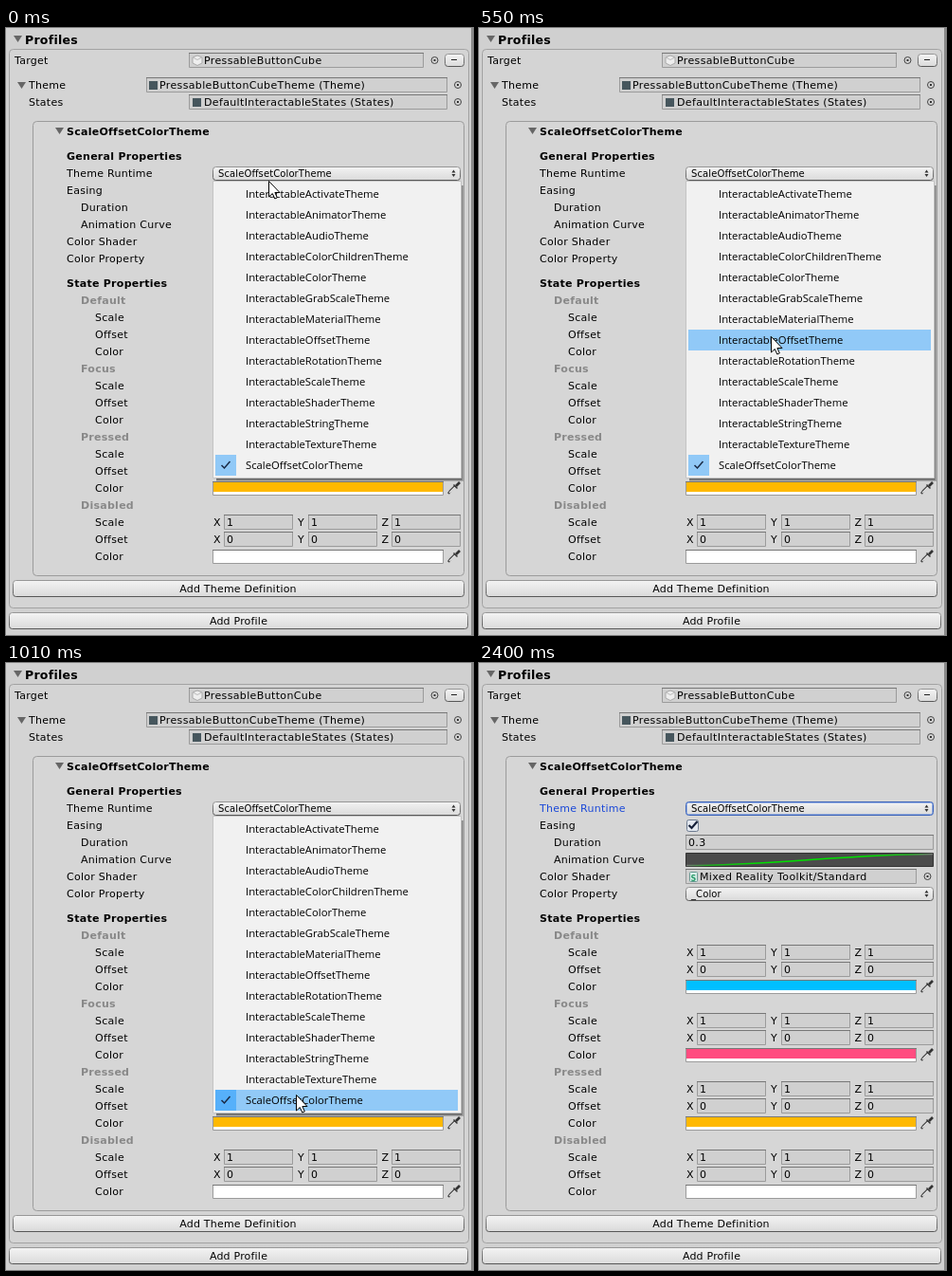
Animation of 493 by 640 pixels, one loop 3.15 s. Source, as an HTML page with a canvas:

```html
<!DOCTYPE html>
<html>
<head>
<meta charset="utf-8">
<style>
html, body { margin: 0; width: 100%; height: 100%; overflow: hidden; background: #d0d0d0; }
canvas { display: block; }
</style>
</head>
<body>
<canvas id="stage" width="493" height="640"></canvas>
<script>
const g = document.getElementById('stage').getContext('2d');
const LOOP = 3150, MENU_CLOSE = 1700, FOCUS = 1750, CURSOR_GONE = 2400;
const MENU_TOP = 164, ROW = 22;
const ITEMS = ['Activate', 'Animator', 'Audio', 'ColorChildren', 'Color', 'GrabScale', 'Material',
  'Offset', 'Rotation', 'Scale', 'Shader', 'String', 'Texture']
  .map(n => `Interactable${n}Theme`).concat('ScaleOffsetColorTheme');

// Bursts of pointer movement: start, end, number of steps
const BURSTS = [[50, 550, 10], [610, 1010, 8], [1700, 2160, 9], [2280, 2400, 3]];
// Pointer path: time, x, y
const PATH = [[0, 277, 161], [50, 279, 166], [272, 302, 235], [550, 308, 325], [610, 309, 350],
  [667, 309, 386], [900, 307, 445], [1010, 306, 455], [1760, 306, 455], [1900, 313, 473],
  [2160, 354, 559], [2280, 364, 578], [2340, 376, 602], [3150, 376, 602]];

function text(s, x, y, { size = 11, bold = false, color = '#000', align = 'left', gap = 0.27 } = {}) {
  g.font = `${bold ? 'bold ' : ''}${size}px "DejaVu Sans", sans-serif`;
  g.letterSpacing = gap + 'px';
  g.textAlign = align;
  g.fillStyle = color;
  g.fillText(s, x, y + 4);
}

function fill(x, y, w, h, color) {
  g.fillStyle = color;
  g.fillRect(x, y, w, h);
}

function box(x, y, w, h, back, edge, r = 0) {
  g.beginPath();
  g.roundRect(x + 0.5, y + 0.5, w - 1, h - 1, r);
  g.fillStyle = back;
  g.fill();
  g.strokeStyle = edge;
  g.lineWidth = 1;
  g.stroke();
}

function poly(points, color, edge) {
  g.beginPath();
  points.forEach(([x, y]) => g.lineTo(x, y));
  g.closePath();
  g.fillStyle = color;
  g.fill();
  if (edge) {
    g.strokeStyle = edge;
    g.lineWidth = 1;
    g.stroke();
  }
}

function line(points, color, width) {
  g.beginPath();
  points.forEach(([x, y]) => g.lineTo(x, y));
  g.strokeStyle = color;
  g.lineWidth = width;
  g.stroke();
}

function shade(y, h, top, bottom) {
  const s = g.createLinearGradient(0, y, 0, y + h);
  s.addColorStop(0, top);
  s.addColorStop(1, bottom);
  return s;
}

function field(x, right, cy, s = '', pad = 3) {
  box(x, cy - 8, right - x, 16, '#d0d0d0', '#9b9b9b');
  fill(x, cy - 8, right - x, 1, '#777');
  text(s, x + pad, cy, { gap: 0.36 });
}

function button(x, y, w, h, edge = shade(y, h, '#999', '#555')) {
  box(x, y, w, h, shade(y, h, '#f4f4f4', '#d9d9d9'), edge, 3);
}

function popup(cy, s, focused) {
  button(218, cy - 7, 262, 15, focused ? '#3b62b8' : undefined);
  if (focused) {
    g.strokeStyle = 'rgba(70,120,220,.5)';
    g.strokeRect(219.5, cy - 5.5, 259, 12);
  }
  text(s, 224, cy, { size: 10, gap: 0.1 });
  poly([[470.5, cy - 0.5], [472.5, cy - 3.5], [474.5, cy - 0.5]], '#333');
  poly([[470.5, cy + 1], [472.5, cy + 4], [474.5, cy + 1]], '#333');
}

function foldout(x, y) {
  poly([[x, y], [x + 9, y], [x + 4.5, y + 7]], '#666');
}

function picker(x, y) {
  g.beginPath();
  g.arc(x, y, 3.5, 0, 7);
  g.strokeStyle = '#444';
  g.lineWidth = 1;
  g.stroke();
  fill(x - 1, y - 1, 2, 2, '#333');
}

function eyedropper(x, cy) {
  line([[x, cy + 6], [x + 2, cy + 3], [x + 7, cy - 2]], '#444', 2.4);
  line([[x + 1, cy + 5], [x + 7, cy - 1]], '#e8e8e8', 1.2);
  line([[x + 5.5, cy - 3.5], [x + 9.5, cy + 0.5]], '#333', 1.5);
  line([[x + 8, cy - 2], [x + 12, cy - 6]], '#333', 2.6);
}

function tick(x, y, color, width) {
  line([[x, y], [x + 3, y + 3], [x + 9, y - 4]], color, width);
}

function vector(cy, name, value) {
  text(name, 94, cy);
  [['X', 219, 230], ['Y', 308, 319], ['Z', 396.5, 407]].forEach(([axis, x, left]) => {
    text(axis, x, cy);
    field(left, left + 73, cy, value);
  });
}

function state(y, name, color) {
  text(name, 79, y, { bold: true, color: '#888' });
  vector(y + 18, 'Scale', '1');
  vector(y + 36, 'Offset', '0');
  const cy = y + 54;
  text('Color', 94, cy);
  box(218, cy - 7, 244, 15, '#fff', '#9b9b9b');
  fill(218, cy - 7, 244, 1, '#777');
  fill(219, cy - 6, 242, 10, color);
  eyedropper(467, cy);
}

function inspector(focused) {
  fill(0, 0, 493, 640, '#d0d0d0');
  box(3, 22, 486, 590, '#d4d4d4', '#a2a2a2', 4);
  box(28, 98, 456, 480, '#d6d6d6', '#9c9c9c', 4);
  fill(491, 0, 2, 640, '#8a8a8a');

  foldout(8, 8);
  text('Profiles', 20, 13, { size: 12.5, bold: true });
  text('Target', 9, 34);
  field(193, 441, 34, 'PressableButtonCube', 16);
  poly([[197, 31], [202, 29], [207, 31], [207, 37], [202, 39.5], [197, 37]], '#eee', '#aaa');
  line([[197, 31], [202, 33.5], [207, 31]], '#bbb', 1);
  picker(452.5, 34);
  button(463, 27, 21, 14);
  fill(470, 33, 6, 1, '#222');

  foldout(12, 57);
  text('Theme', 24, 60);
  field(148, 466, 60, 'PressableButtonCubeTheme (Theme)', 14);
  fill(151, 56, 9, 9, '#46565d');
  picker(477, 60);
  text('States', 24, 78);
  field(193, 466, 78, 'DefaultInteractableStates (States)', 16);
  fill(197, 74, 9, 9, '#46565d');
  picker(477, 78);

  foldout(52, 105);
  text('ScaleOffsetColorTheme', 64, 109, { bold: true });
  text('General Properties', 64, 135, { bold: true });
  text('Theme Runtime', 64, 153, { color: focused ? '#1a48d8' : '#000' });
  popup(153, 'ScaleOffsetColorTheme', focused);
  text('Easing', 64, 171);
  box(219, 165, 13, 13, '#e3e8ef', '#6d7b90', 2);
  tick(221.5, 171, '#15203a', 2.2);
  text('Duration', 79, 189);
  field(218, 480, 189, '0.3');
  text('Animation Curve', 79, 207);
  box(218, 200, 262, 15, '#4b4b4b', '#333');
  g.beginPath();
  g.moveTo(219, 213.5);
  g.bezierCurveTo(305, 213.5, 393, 201.5, 479, 201.5);
  const ink = g.createLinearGradient(219, 0, 479, 0);
  [[0, '#777'], [0.1, '#1fae1f'], [0.3, '#00e000'], [0.75, '#00e000'], [0.9, '#1fae1f'], [1, '#777']]
    .forEach(stop => ink.addColorStop(...stop));
  g.strokeStyle = ink;
  g.lineWidth = 1.3;
  g.stroke();
  text('Color Shader', 64, 225);
  field(218, 462, 225, 'Mixed Reality Toolkit/Standard', 15);
  box(222, 220, 9, 11, '#d9f0ea', '#6c9a94', 1);
  text('S', 223.5, 225.5, { size: 8, bold: true, color: '#2a9a6a', gap: 0 });
  picker(473.5, 225);
  text('Color Property', 64, 243);
  popup(243, '_Color');

  text('State Properties', 64, 269, { bold: true });
  state(287, 'Default', '#00bfff');
  state(359, 'Focus', '#ff4c80');
  state(431, 'Pressed', '#ffb900');
  state(503, 'Disabled', '#fff');

  button(7, 582, 477, 18);
  text('Add Theme Definition', 245, 591, { align: 'center', gap: 0.2 });
  button(3, 616, 485, 18);
  text('Add Profile', 245.5, 625, { align: 'center', gap: 0.2 });
}

function menuItem(i, lit) {
  const y = MENU_TOP + i * ROW, checked = i === ITEMS.length - 1;
  if (lit) fill(221, y, 256, ROW, '#91c9f7');
  if (checked) {
    fill(221, y, 22, ROW, lit ? '#56b0fa' : '#91c9f7');
    tick(227.5, y + 11, '#1a2a44', 1.5);
  }
  g.font = '11.3px "Open Sans", sans-serif';
  g.letterSpacing = '0px';
  g.textAlign = 'left';
  g.fillStyle = '#000';
  g.fillText(ITEMS[i], 253, y + 15);
}

function menu(row) {
  for (let i = 0; i < 3; i++) fill(222, 166, 259 + i, 310 + i, 'rgba(0,0,0,.22)');
  box(218, 161, 263, 314, '#f1f1f1', '#c4c4c4');
  ITEMS.forEach((_, i) => menuItem(i, i === row));
}

function pointer([x, y]) {
  poly([[0, 0], [0, 16.5], [3.8, 13], [6.3, 18.5], [8.8, 17.4], [6.4, 12], [11.5, 12]]
    .map(([dx, dy]) => [x + 0.5 + dx, y + 0.5 + dy]), '#fff', '#000');
}

function at(t) {
  const i = Math.max(1, PATH.findIndex(p => p[0] >= t));
  const a = PATH[i - 1], b = PATH[i];
  const k = Math.max(0, (t - a[0]) / (b[0] - a[0]));
  return [1, 2].map(j => a[j] + (b[j] - a[j]) * k);
}

// Hold the time of the latest step
function stepTime(t) {
  let held = 0;
  for (const [start, end, n] of BURSTS) {
    if (t < start) break;
    const d = (end - start) / (n - 1);
    held = start + Math.min(n - 1, Math.floor((t - start) / d + 0.02)) * d;
  }
  return held;
}

function draw(now) {
  const t = stepTime(now % LOOP);
  inspector(t >= FOCUS);
  if (t < MENU_CLOSE) {
    // The highlight trails the pointer slightly
    menu(Math.floor((at(t - 6)[1] - MENU_TOP) / ROW));
  } else {
    g.globalAlpha = Math.max(0, 0.85 - (t - MENU_CLOSE) / 400);
    menuItem(ITEMS.length - 1, true);
    g.globalAlpha = 1;
  }
  if (t < CURSOR_GONE) pointer(at(t).map(Math.round));
}

const begin = performance.now();
function animate() {
  draw(performance.now() - begin);
  requestAnimationFrame(animate);
}
animate();
</script>
</body>
</html>
```
